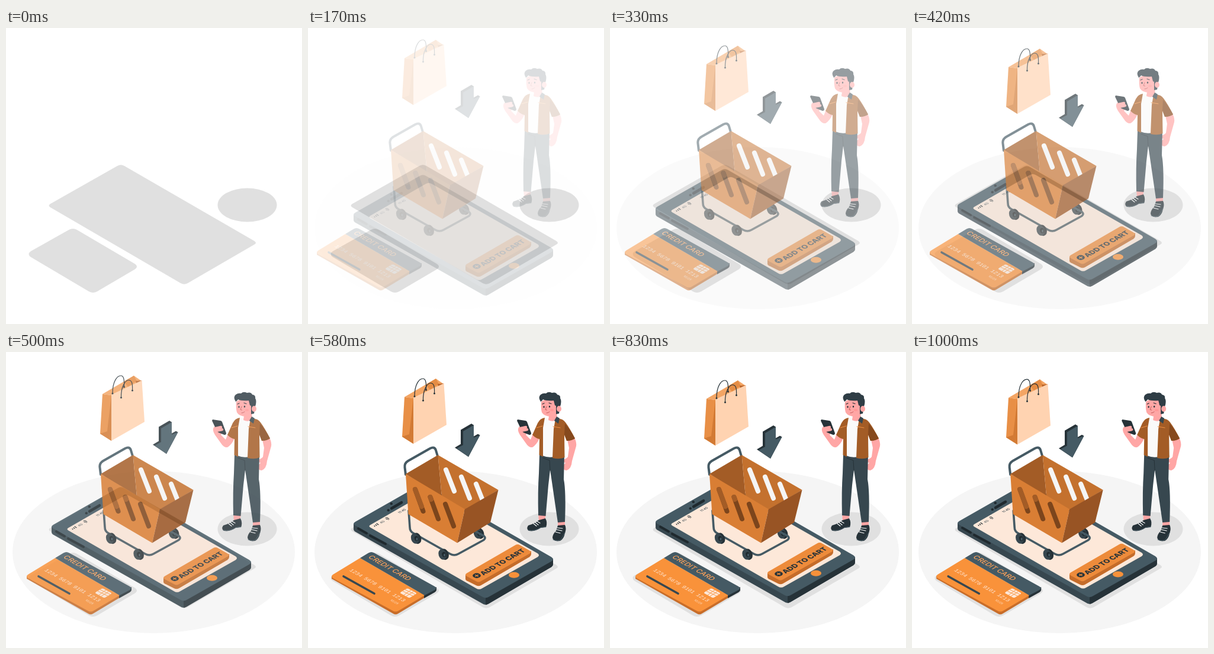
Write an HTML page that moves like this. It is 500 px wide and 500 px high and loops after 1040 ms.

```html
<!DOCTYPE html>
<html lang="en">
<head>
<meta charset="utf-8">
<title>Add to cart</title>
<style>
html, body { margin: 0; width: 100%; height: 100%; overflow: hidden; background: #fff; }
svg { display: block; width: 100vw; height: 100vh; }
text { font-family: Inter, Arial, sans-serif; text-anchor: middle; }
.mono { font-family: "Liberation Mono", monospace; }
.line { fill: none; stroke-linecap: round; stroke-linejoin: round; }
</style>
</head>
<body>
<svg viewBox="0 0 500 500">
<defs>
  <g id="wheel">
    <ellipse cx="2" cy="1" rx="7" ry="9.5" transform="rotate(-18)" fill="#263238"/>
    <ellipse cx="-1.5" rx="6.5" ry="9" transform="rotate(-18)" fill="#37474f"/>
    <ellipse cx="1" cy="1" rx="3.2" ry="4.4" transform="rotate(-18)" fill="#1f292e"/>
    <ellipse cx="2" cy="1.5" rx="1.6" ry="2.4" fill="#455a64"/>
  </g>
</defs>

<ellipse data-move="0 0" cx="249.500" cy="338" rx="238.500" ry="137" fill="#f5f5f5"/>

<!-- ground shadows -->
<g fill="#e0e0e0">
  <path d="M188 233Q194 229.500 200 233L419 359.500Q425 363 419 366L307 431Q301 434.500 295 431L75 303Q70 300 75 297Z"/>
  <path d="M106 341Q113 337 120 341L217 398Q225 403 217 408L154 445Q147 449 140 445L42 387Q35 382 42 377Z"/>
  <ellipse cx="407.500" cy="299" rx="50" ry="28.500"/>
</g>

<!-- phone -->
<g data-move="0 -1"><g transform="translate(0 -.8)">
  <path d="M77 288V297Q77 300 81 302L295 423Q300 426 305 423L411 361Q414 359 414 356V347Z" fill="#37474f"/>
  <path d="M300 412V425L305 423 411 361Q414 359 414 356V347Z" fill="#263238"/>
  <path d="M188 223Q194 219 200 223L411 344Q417 348 411 351.500L306 411Q300 415 294 411L80 291Q74 288 80 284.500Z" fill="#455a64"/>
  <path d="M199 236Q204 233 209 236L388 338Q392 341 388 344L294 397Q289 400 284 397L105 294Q102 292 105 290Z" fill="#fde8d9"/>
  <g class="line" stroke="#1f292e">
    <path d="M85 296L99 304M105 308L131 322" stroke-width="4"/>
    <path d="M141 262L158 252" stroke-width="4.500"/>
    <path d="M140.500 254h.5M135.500 265h.5" stroke-width="4"/>
    <path d="M112 291.500l1 .8M114 289.500l2 1.400M116 287.500l3 2" stroke-width="1.200"/>
    <path d="M131 278q4-1.500 6 2M132 280q3-1 4 1" stroke-width="1"/>
  </g>
  <g fill="#37474f" font-size="5.500">
    <text transform="matrix(.866 -.5 .866 .5 127 286)">4G</text>
    <text transform="matrix(.866 -.5 .866 .5 160.500 267.500)" font-weight="500">11:45</text>
  </g>
  <path d="M266 375V381Q266 383 268 384L284 392Q288 394 292 392L374 344Q377 342 377 339V334Z" fill="#c56c2a"/>
  <path d="M350 324Q354 321.500 358 324L374 333Q379 336 374 338.500L292 385Q288 387.500 284 385L268 376.500Q264 374 268 371.500Z" fill="#ed8b3b"/>
  <g transform="matrix(.866 -.5 .866 .5 285 375.500)">
    <circle r="5.600" fill="#263238"/>
    <path d="M-3.200 0H3.200M0-3.200V3.200" stroke="#ed8b3b" stroke-width="1.500"/>
  </g>
  <text transform="matrix(.866 -.5 .866 .5 328.500 352.500)" y="4.300" font-size="12" font-weight="800" fill="#263238">ADD TO CART</text>
  <ellipse cx="348" cy="374.500" rx="9" ry="5" fill="#f7913a"/>
</g></g>

<!-- cart -->
<g data-move="1 0">
  <use href="#wheel" x="291" y="306"/>
  <path class="line" d="M173 268L175 296Q175 303 181 306L243 341Q250 345 257 341L299 318Q305 314 299 310L284 302" stroke="#455a64" stroke-width="3.600"/>
  <use href="#wheel" x="185" y="314.500"/>
  <use href="#wheel" x="231.500" y="341.500"/>
  <path class="line" d="M168 207L166.500 195Q165.500 188 172 184L209 163Q217 159 219 166L222 176" stroke="#455a64" stroke-width="4"/>
  <path d="M168 206L222.500 174 229 245Z" fill="#a35c26"/>
  <path d="M222.500 174L324.500 233 268 267 229 245Z" fill="#c4712e"/>
  <path class="line" d="M236 199L250 235M262 211L276 247M287 223L299 253" stroke="#f5f5f5" stroke-width="8"/>
  <path d="M168 206L268 265.500 255 322.500 172.500 274Z" fill="#d97e34"/>
  <path d="M268 265.500L324.500 233 311 288 255 322.500Z" fill="#985424"/>
  <g class="line" stroke-width="8">
    <path d="M184 232L197.500 269M209.500 245L223 282M235 257L249 294" stroke="#7c451c"/>
    <path d="M184 232L195 261M209.500 245L211 249" stroke="#a35c26"/>
  </g>
</g>

<!-- credit card -->
<g data-move="1 0">
  <path d="M43 378V383L147 442Q151 444.500 155 442L200 415V408Z" fill="#c86d29"/>
  <path d="M199 409V416L217 406Q220 404 220 402V397Z" fill="#263238"/>
  <path d="M91 348L200 411 156 437Q151 440 146 437L45 382Q41 379 45 376Z" fill="#f9923a"/>
  <path d="M91 348L105 339.500Q110 336.500 115 339.500L217 396Q222 399 217 402L200 411Z" fill="#455a64"/>
  <text transform="matrix(.866 .5 -.866 .5 141.500 364.700)" y="4.200" font-size="11.800" fill="#ffa259" font-weight="500">CREDIT CARD</text>
  <text class="mono" transform="matrix(.866 .5 -.866 .5 120.500 394)" y="3" font-size="9.300" fill="#ffe9da">1234 5678 9101 1213</text>
  <text transform="matrix(.866 .5 -.866 .5 149 422)" y="2" font-size="5.500" fill="#ffe0c9">10/25</text>
  <path class="line" d="M63 379L115 408" stroke="#37474f" stroke-width="3.600"/>
  <path d="M169 400Q171 399 173 400L185 406.500Q187 407.500 185 409L176 414.500Q174 415.500 172 414.500L160 408Q158 407 160 405.500Z" fill="#fde8d9"/>
  <path d="M163 404L180 412M167 401.500L184 409.500M177 402L165 410.500M181 405L169 412.500" stroke="#f9923a" stroke-width=".9"/>
</g>

<!-- shopping bag -->
<g data-move="0 1">
  <path d="M163 79L216 48 229 57 178 81Z" fill="#f3a564"/>
  <path d="M216 48L221 57 206 67 199 58Z" fill="#e58d45"/>
  <path d="M219 57L230 56 220 61Z" fill="#b9642a"/>
  <path d="M163 79L178 81V158L159 146Z" fill="#e88f46"/>
  <path d="M178 81V158L171 142Z" fill="#d27a34"/>
  <path d="M159 146L171 142 178 158Z" fill="#d27a34"/>
  <path class="line" d="M180 78C180 57 188 48 194 48C199 48 200 55 199.500 67" stroke="#263238" stroke-width="1.200"/>
  <path d="M178 80L229.500 56 234 126 178 158Z" fill="#ffd3b1"/>
  <g class="line" stroke="#263238">
    <path d="M194.500 85C194 66 202 55.500 207 55.500C213 55.500 214 62 213.500 73" stroke-width="1.200"/>
    <path d="M180 78v.1M199.500 67v.1M194.500 85v.1M213.500 73v.1" stroke-width="3"/>
  </g>
</g>

<!-- arrow -->
<g data-move="0 1">
  <path d="M258 134.500L276 124 280 126.500V145.500L287 141.500 290.500 143.500 271 180 248 164.500 258 158.500Z" fill="#263238"/>
  <path d="M262 137L280 126.500V147.500L290.500 143.500 271 180 251 166 262 160Z" fill="#455a64"/>
</g>

<!-- shopper -->
<g data-move="1 0">
  <g fill="#ffa6a5">
    <path d="M392 272H405L403 286 393 287Z"/>
    <path d="M425 283H437V295L425 296Z"/>
    <path d="M383 138L394 146Q389 157 382 161Q376 162 371 154L361 140Q356 132 359 127Q364 123 373 126Q378 130 375 135L371 140 379 148Z"/>
    <path d="M441 148L453 145Q457 152 456 159L449 184Q448 197 440 200Q433 200 433 193L438 187Q433 187 434 182Q440 180 442 177L444 162Z"/>
  </g>
  <path d="M393 284L404 281Q408 288 405 296L396 297Q386 304 376 302Q371 299 375 293Q386 290 393 284ZM425 293L437 292Q440 298 437 306Q435 316 429 319Q418 321 416 314Q416 308 422 302Z" fill="#263238"/>
  <path class="line" d="M384 290l5 4M387 288l5 4M390 286l5 3M421 304l8 2M423 300l9 2M424 297l9 1" stroke="#fff" stroke-width="1.200"/>
  <path class="line" d="M375 301Q387 303 396 296.500L405 295M417 317Q425 320 430 317L437 305" stroke="#455a64" stroke-width="1"/>
  <path d="M394 174H436L435 215Q439 235 437 287L425 288 412 199 409 225 404.500 277 392 276Q391 235 393 205Z" fill="#37474f"/>
  <path class="line" d="M400 179L411 183 412 200" stroke="#263238" stroke-width="1"/>
  <path d="M399 112L422 111 419 177Q408 179 399 175Z" fill="#fafafa"/>
  <path d="M411 100H423L424 114Q417 119 409 115Z" fill="#ffa6a5"/>
  <path d="M403 111Q395 112 391 120L382 140Q388 146 394 147L393.500 174 400 177 400 128Z" fill="#a35c26"/>
  <path d="M421 113Q432 111 438 119Q446 130 454 146Q448 150 440 150L436 140 436.500 178Q428 182 416 179L418 130Z" fill="#a35c26"/>
  <path d="M437 121Q446 131 454 146Q448 150 440 150L436 139Z" fill="#86491d"/>
  <path class="line" d="M389 128L399 125M417 126L429 128" stroke="#f08f42" stroke-width="1"/>
  <path d="M423 109L428 112 426 121 419 116Z" fill="#37474f"/>
  <path d="M357 114L370 116Q372 116 373 118L380 137Q380 140 377 140L367 136Q365 135 364 133L356 116Z" fill="#263238"/>
  <path class="line" d="M362 129L371 127M363 133L373 131" stroke="#ffa6a5" stroke-width="4.500"/>
  <path d="M397 84Q408 75 424 83L425 97Q423 107 414 109Q402 109 398 102Q396 95 397 84Z" fill="#ffa6a5"/>
  <path d="M396 84Q391 76 396 72Q400 69 405 70Q409 66 415 69Q422 67 424 72Q430 73 429 78Q432 83 429 92L427 104 422 105 422 91 420 90 418 82Q405 83 400 80Q399 82 396 84Z" fill="#2f3d45"/>
  <ellipse cx="427" cy="96" rx="4" ry="5" fill="#ffa6a5"/>
  <ellipse cx="415" cy="98" rx="3" ry="2" fill="#ff9897"/>
  <g class="line" stroke="#263238">
    <path d="M401.500 92.500v.5M411 92v.5" stroke-width="2.400"/>
    <path d="M399 88L402 86.500M410 86L414 87.500" stroke-width="1.200"/>
    <path d="M406 92L404 97.500 406.500 98M406 103Q409 103 411 101" stroke="#c55d5c" stroke-width="1"/>
  </g>
</g>
</svg>

<script>
const LOOP = 1040, FPS = 24, START = 2, LANDED = 14, FLOAT = 11.5;
const parts = [...document.querySelectorAll('[data-move]')].map(el => ({
  el, dir: el.dataset.move.split(' ').map(Number)
}));

// Parts slide in at a steady pace, then ease 3px further and back.
function offset(step) {
  if (step < LANDED) return -3 - 2.5 * (LANDED - step);
  return -3 + 3 * Math.sin(Math.PI * (step - LANDED) / FLOAT);
}

function draw(now) {
  const step = Math.floor((now % LOOP + 4) * FPS / 1000);
  const shift = offset(step);
  const alpha = Math.min(1, Math.max(0, (step - START) / (LANDED - START)));
  for (const { el, dir: [x, y] } of parts) {
    el.setAttribute('transform', `translate(${x * shift} ${y * shift})`);
    el.setAttribute('opacity', alpha);
  }
}

const begin = performance.now();
function tick() {
  draw(performance.now() - begin);
  requestAnimationFrame(tick);
}
tick();
</script>
</body>
</html>
```
